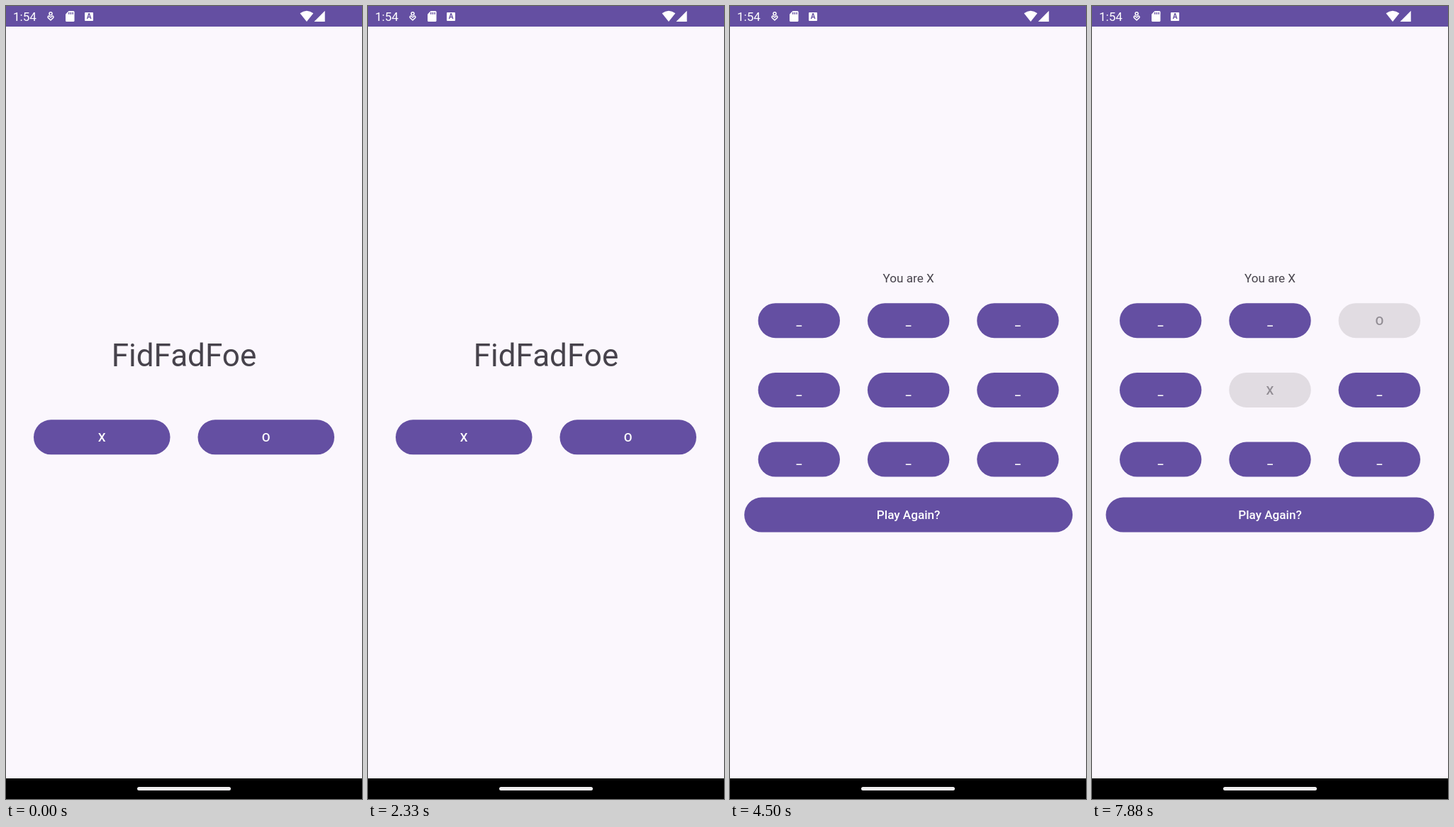
These frames come from a looping animation (502 by 1116 pixels, 8 s). An HTML page with a canvas:

```html
<!DOCTYPE html>
<html lang="en">
<head>
<meta charset="utf-8">
<title>Noughts and crosses</title>
<style>
html, body { margin: 0; width: 100%; height: 100%; overflow: hidden; background: #fbf7fd; }
canvas { display: block; }
</style>
</head>
<body>
<canvas id="stage" width="502" height="1116"></canvas>
<script>
const ctx = document.getElementById('stage').getContext('2d');
const W = 502, H = 1116, LOOP = 8000;
const SURFACE = '#fbf7fd', PURPLE = '#644fa2', INK = '#47434c';
const PRESS = 2980, OPEN = 4183, MOVE = 6700;

const clamp = v => Math.max(0, Math.min(1, v));

function text(str, x, y, size, color, weight = 400, align = 'center') {
  ctx.font = `${weight} ${size}px Roboto, sans-serif`;
  ctx.textAlign = align;
  ctx.fillStyle = color;
  ctx.fillText(str, x, y);
}

function rect(x, y, w, h, color, r = 0) {
  ctx.fillStyle = color;
  ctx.beginPath();
  ctx.roundRect(x, y, w, h, r);
  ctx.fill();
}

function shape(color, path) {
  ctx.fillStyle = color;
  ctx.fill(new Path2D(path));
}

function button(label, x, y, w, { color = PURPLE, ink = '#fff', glow = 0 } = {}) {
  rect(x, y, w, 49, color, 24.5);
  if (glow) rect(x, y, w, 49, `rgba(255,255,255,${glow})`, 24.5);
  text(label, x + w / 2, y + 30.6, 17.1, ink, 500);
}

// One cubic segment: finds y for a given x by bisection.
function cubic(x, [x0, y0, x1, y1, x2, y2, x3, y3]) {
  const at = (u, a, b, c, d) =>
    (1 - u) ** 3 * a + 3 * (1 - u) ** 2 * u * b + 3 * (1 - u) * u * u * c + u ** 3 * d;
  let lo = 0, hi = 1;
  for (let i = 0; i < 24; i++) {
    const mid = (lo + hi) / 2;
    if (at(mid, x0, x1, x2, x3) < x) lo = mid; else hi = mid;
  }
  return at(lo, y0, y1, y2, y3);
}

// Fast start with a very long settle.
const slideEase = x => x <= 0 ? 0 : x >= 1 ? 1 : x < 1 / 6
  ? cubic(x, [0, 0, 0.05, 0, 0.1333, 0.06, 1 / 6, 0.4])
  : cubic(x, [1 / 6, 0.4, 0.2083, 0.82, 0.25, 1, 1, 1]);

function home(t) {
  const glow = 0.08 * clamp((t - PRESS) / 120) * clamp((3500 - t) / 280);
  text('FidFadFoe', 251, 507.3, 44, INK);
  button('X', 39, 582.3, 192.5, { glow });
  button('O', 270.5, 582.3, 192.5);
}

function game(t) {
  const marks = t < MOVE ? '_________' : '__O_X____';
  text('You are X', 251, 389, 17.1, INK);
  [...marks].forEach((mark, i) => {
    const x = 39 + (i % 3) * 154.3, y = 418.2 + Math.floor(i / 3) * 97.7;
    const style = mark === '_' ? {} : { color: '#e1dce2', ink: '#918c93' };
    button(mark, x, y, 115.4, style);
  });
  button('Play Again?', 19.5, 691.6, 463);
}

function bars() {
  rect(0, 0, W, 29, PURPLE);
  text('1:54', 10, 21.3, 17.1, '#fff', 400, 'left');

  // person with heart
  ctx.strokeStyle = '#fff';
  ctx.lineWidth = 1.5;
  ctx.stroke(new Path2D('M65 10.8a2 2 0 1 1-4 0a2 2 0 1 1 4 0Z' +
    'M63 20L59.2 16.3Q58.6 14.2 60.7 14L63 16L65.3 14Q67.4 14.2 66.8 16.3Z'));

  // memory card
  shape('#fff', 'M88.5 7H95Q96.5 7 96.5 8.5V20.5Q96.5 22 95 22H85.5Q84 22 84 20.5V11.5Z');
  for (const x of [88, 90.7, 93.4]) rect(x, 8.8, 1.4, 3, PURPLE);

  // boxed letter
  rect(111, 9, 12, 12, '#fff', 1);
  text('A', 117, 18.2, 10, PURPLE, 700);

  shape('#fff', 'M424 22L414.6 10.2Q424 3.2 433.4 10.2Z');
  shape('#fff', 'M434.5 22L449.7 6.8V22Z');

  rect(0, 1087, W, 29, '#000');
  rect(185, 1099, 132, 5, '#f0eff0', 2.5);
}

function draw(now) {
  const t = now % LOOP;
  const slide = slideEase((t - OPEN) / 450);
  const fade = clamp((t - OPEN - 50) / 83);
  const shift = W / 10;

  rect(0, 0, W, H, SURFACE);
  ctx.save();
  ctx.translate(-shift * slide, 0);
  home(t);
  ctx.restore();

  // The new screen is blended as one layer: its shapes never overlap.
  if (fade > 0) {
    ctx.save();
    ctx.globalAlpha = fade;
    layer(t, shift * (1 - slide), fade);
    ctx.restore();
  }
  bars();
  requestAnimationFrame(draw);
}

const main = ctx.canvas;
const sheet = new OffscreenCanvas(W, H);
const sheetCtx = sheet.getContext('2d');

// Copies the screen aside, paints the game opaque, then restores the rest on top.
function layer(t, dx, fade) {
  sheetCtx.globalAlpha = 1;
  sheetCtx.drawImage(main, 0, 0);
  ctx.globalAlpha = 1;
  rect(0, 0, W, H, SURFACE);
  ctx.translate(dx, 0);
  game(t);
  ctx.translate(-dx, 0);
  if (fade < 1) {
    ctx.globalAlpha = 1 - fade;
    ctx.drawImage(sheet, 0, 0);
  }
}

requestAnimationFrame(draw);
</script>
</body>
</html>
```
